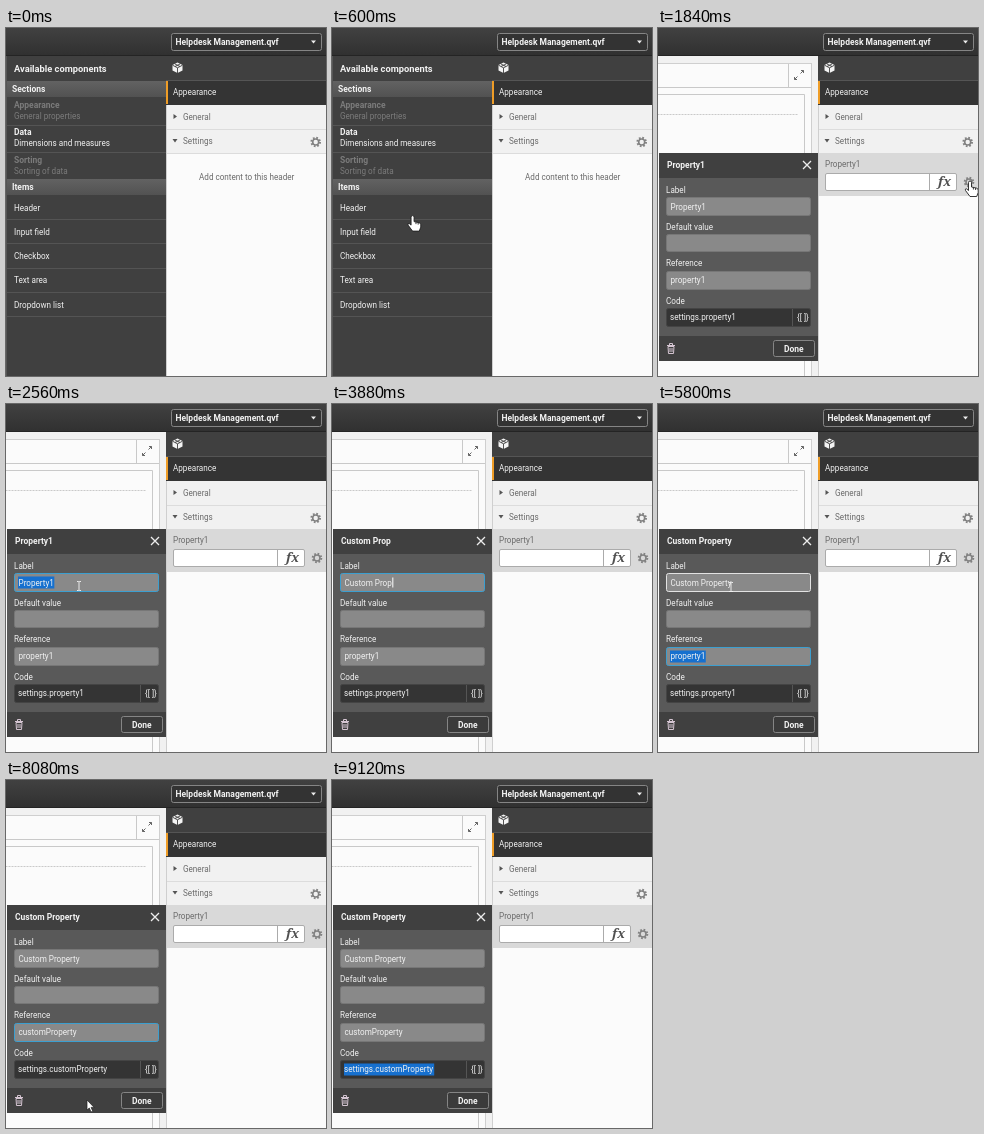
An HTML page for the animation above (9.2 s loop, 320x348 px).

```html
<!DOCTYPE html>
<html lang="en">
<head>
<meta charset="utf-8">
<title>Property editor</title>
<style>
  html, body { margin: 0; width: 100%; height: 100%; overflow: hidden; background: #fbfbfb; }
  svg { display: block; width: 320px; height: 348px; }
  text { font: 8.15px Roboto, sans-serif; fill: #f2f2f2; white-space: pre; }
  .bold { font-weight: 700; font-size: 8.5px; }
  .title { font-weight: 700; font-size: 9.3px; }
  .faded text { fill: #7b7b7b; }
  .grey { fill: #6a6a6a; }
  .fx { font: italic 700 13px "Noto Serif", "Liberation Serif", serif; fill: #505050; }
  .input { fill: #898989; stroke: #777; stroke-width: 1; }
  .input.hover { stroke: #e2e2e2; }
  .input.focus { stroke: #3c9fd0; }
  .input.dark { fill: #343434; stroke: #444; }
  .selection { fill: #1670cf; }
  .line { fill: none; stroke: #c9c9c9; }
  .pointer { stroke-linejoin: round; }
</style>
</head>
<body>
<svg viewBox="0 0 320 348">
  <defs>
    <linearGradient id="bar" x2="0" y2="1">
      <stop stop-color="#414141"/><stop offset="1" stop-color="#303030"/>
    </linearGradient>
    <linearGradient id="section" x2="0" y2="1">
      <stop stop-color="#626262"/><stop offset="1" stop-color="#525252"/>
    </linearGradient>
    <g id="gear" fill="none" stroke="#818181">
      <circle r="4.3" stroke-width="2" stroke-dasharray="1.69"/>
      <circle r="3" stroke-width="1.6"/>
    </g>
  </defs>

  <rect width="320" height="348" fill="#fbfbfb"/>

  <g id="sheet">
    <rect y="28" width="160" height="320" fill="#f1f1f1"/>
    <rect x="-1" y="35.5" width="154.5" height="320" fill="#fbfbfb" stroke="#cfcfcf"/>
    <path class="line" d="M0 59.5H153M130.5 36V59M0 66.5H146.5V348"/>
    <path class="line" d="M0 86.5H140" stroke-dasharray="1 .5"/>
    <path d="M142.5 45.5L145.5 42.5M143 42.5h2.5V45M139.5 48.5L136.500 51.500M139 51.500h-2.500V49" fill="none" stroke="#666"/>
  </g>

  <g id="components">
    <rect y="28" width="160" height="320" fill="#404040"/>
    <text class="title" x="8" y="43.500">Available components</text>
    <rect y="53" width="160" height="16" fill="url(#section)"/>
    <rect y="151" width="160" height="16" fill="url(#section)"/>
    <text class="bold" x="6" y="63.500">Sections</text>
    <text class="bold" x="6" y="161.500">Items</text>
    <g class="faded">
      <text class="bold" x="8" y="80">Appearance</text>
      <text x="8" y="91">General properties</text>
      <text class="bold" x="8" y="134.500">Sorting</text>
      <text x="8" y="145.500">Sorting of data</text>
    </g>
    <text class="bold" x="8" y="107">Data</text>
    <text x="8" y="118">Dimensions and measures</text>
    <text x="8" y="182.500">Header</text>
    <text x="8" y="206.500">Input field</text>
    <text x="8" y="231">Checkbox</text>
    <text x="8" y="255">Text area</text>
    <text x="8" y="279.500">Dropdown list</text>
    <path d="M0 97.500H160M0 124.500H160M0 191.500H160M0 215.500H160M0 240.500H160M0 264.500H160M0 288.500H160" stroke="#545454"/>
    <path d="M.5 28V348" stroke="#565656"/>
  </g>

  <rect width="320" height="28" fill="url(#bar)"/>
  <path d="M0 27.500H320" stroke="#242424"/>
  <rect x="165.500" y="5.500" width="150" height="17" rx="2" fill="#333" stroke="#858585"/>
  <text class="bold" x="169.500" y="17">Helpdesk Management.qvf</text>
  <path d="M305 12.500h5l-2.500 3z" fill="#eee"/>

  <rect x="160" y="28" width="160" height="24" fill="#404040"/>
  <path d="M171.500 34.500l5 2.500v5.500l-5 2.500l-5-2.500v-5.500z" fill="#f4f4f4"/>
  <path d="M166.500 37.200l5 2.600l5-2.600M171.500 39.800V45M169 36l5 2.500M174 36l-5 2.500" fill="none" stroke="#404040" stroke-width=".9"/>
  <rect x="160" y="52" width="160" height="25" fill="#343434"/>
  <path d="M160 52.500H320" stroke="#555"/>
  <rect x="160" y="53" width="2" height="23" fill="#ef9d27"/>
  <text x="167" y="67">Appearance</text>
  <rect x="161" y="77" width="159" height="48" fill="#f1f1f1"/>
  <path d="M161 101.500H320M161 125.500H320" stroke="#dcdcdc"/>
  <path d="M167.500 86v5l3.500-2.500zM166.500 111h5l-2.500 3.500z" fill="#555"/>
  <text class="grey" x="177" y="92">General</text>
  <text class="grey" x="177" y="116">Settings</text>
  <use href="#gear" x="309.700" y="114"/>

  <text id="empty" class="grey" x="193" y="152">Add content to this header</text>
  <g id="property">
    <rect id="active" x="161" y="125" width="159" height="43" fill="#d9d9d9"/>
    <text class="grey" x="167" y="139">Property1</text>
    <rect x="167.500" y="145.500" width="131" height="17" rx="1.500" fill="#fff" stroke="#ababab"/>
    <path d="M271.500 146V162" stroke="#ababab"/>
    <text class="fx" x="280" y="158">fx</text>
    <use href="#gear" x="311" y="154"/>
  </g>
  <path d="M160.500 77V348" stroke="#cfcfcf"/>

  <g id="dialog">
    <rect x="1" y="125" width="159" height="208" fill="#595959"/>
    <path d="M1 125h159v25H1zM1 308h159v25H1z" fill="#404040"/>
    <text id="heading" class="bold" x="9" y="140"/>
    <path d="M145 133l8 8M153 133l-8 8" stroke="#ededed" stroke-width="1.300"/>
    <text x="8" y="164.500">Label</text>
    <text x="8" y="201.500">Default value</text>
    <text x="8" y="238">Reference</text>
    <text x="8" y="275.500">Code</text>
    <rect id="labelBox" class="input" x="8.500" y="169.500" width="144" height="18" rx="2"/>
    <rect id="valueBox" class="input" x="8.500" y="206.500" width="144" height="17" rx="2"/>
    <rect id="referenceBox" class="input" x="8.500" y="243.500" width="144" height="18" rx="2"/>
    <rect class="input dark" x="8.500" y="280.500" width="144" height="18" rx="2"/>
    <path d="M134.500 281v17" stroke="#555"/>
    <text x="139" y="292">{[ ]}</text>
    <rect id="labelSelection" class="selection" x="12" y="172.500" height="12"/>
    <rect id="referenceSelection" class="selection" x="12" y="246.500" height="12"/>
    <rect id="codeSelection" class="selection" x="12" y="283.500" height="12"/>
    <text id="label" x="12.500" y="181.500"/>
    <text id="reference" x="12.500" y="255"/>
    <text id="code" x="12" y="292"/>
    <rect id="caret" width="1" height="10" fill="#fff"/>
    <path d="M9 317.500h8M11.500 317v-1.500h3v1.500M10 318.500l.5 7h5l.5-7zM12 320v4M14 320v4" fill="none" stroke="#d5c5d2"/>
    <rect x="115.500" y="312.500" width="41" height="16" rx="2" fill="#3b3b3b" stroke="#858585"/>
    <text class="bold" x="126" y="323.500">Done</text>
  </g>

  <g id="pointer" class="pointer">
    <path id="arrow" d="M0 0V10l2.300-2l1.700 4l1.800-.8l-1.700-3.800h3z" fill="#fff" stroke="#222" stroke-width=".7"/>
    <path id="hand" d="M-1.500 1.500q0-1.500 1.500-1.500t1.500 1.500V6l5 1.100q1.700.4 1.700 2v2.400L6.700 15.500H0L-4.500 9.500q-.8-1.900 1-1.700l2 1.700zM3.400 6.500v2M5.600 7v2" fill="#fff" stroke="#222" stroke-width=".9"/>
    <path id="beam" d="M-2-4.500h1.500l.5.500l.5-.5H2M0-4V4M-2 4.500h1.500l.5-.5l.5.500H2" fill="none" stroke="#f5f5f5" stroke-width=".9"/>
  </g>
</svg>
<script>
const LOOP = 9200;
const ui = Object.fromEntries([...document.querySelectorAll('[id]')].map(el => [el.id, el]));
const show = (el, on) => { el.style.display = on ? '' : 'none'; };
const within = (t, from, to) => t >= from && t < to;
const ease = p => p * p * (3 - 2 * p);

const rhythm = (start, step, count) => Array.from({ length: count }, (_, i) => start + step * i);
const labelKeys = [...rhythm(3000, 86, 11), 3960, 4200, 4440, 4560];
const referenceKeys = rhythm(6400, 90, 14);

function typed(t, before, after, keys) {
  const count = keys.filter(key => key <= t).length;
  return count ? after.slice(0, count) : before;
}

// Pointer stops: time, x, y, shape from that time on.
const stops = [
  [40, 110, 248, 'arrow'], [360, 42, 202, 'hand'], [440, 42, 202, 'hand'],
  [960, 211, 139, 'hand'], [1160, 214, 139, 'hand'], [1320, 214, 139, 'hand'],
  [1640, 312, 153, 'hand'], [1880, 312, 153, 'arrow'], [2200, 73, 182, 'beam'],
  [3000, 73, 182, ''], [5800, 73, 183, 'beam'], [5880, 73, 183, 'arrow'],
  [6240, 80, 316, 'arrow'], [6400, 80, 316, ''], [7760, 80, 316, 'arrow'],
  [8000, 81, 320, 'arrow'], [8120, 81, 320, 'arrow'], [8360, 78, 290, 'beam'],
  [8840, 78, 290, '']
];

function drawPointer(t) {
  const index = stops.findLastIndex(stop => stop[0] <= t);
  const [from, x, y, shape] = stops[index] || [0, 0, 0, ''];
  const [to, nextX, nextY] = stops[index + 1] || [LOOP, x, y];
  const p = ease((t - from) / (to - from));
  ui.pointer.setAttribute('transform', `translate(${x + (nextX - x) * p} ${y + (nextY - y) * p})`);
  for (const name of ['arrow', 'hand', 'beam']) show(ui[name], name === shape);
}

function select(name, on) {
  const box = ui[name + 'Selection'];
  show(box, on);
  if (on) box.setAttribute('width', ui[name].getComputedTextLength() + 1);
}

function drawDialog(t) {
  const label = typed(t, 'Property1', 'Custom Property', labelKeys);
  const reference = typed(t, 'property1', 'customProperty', referenceKeys);
  ui.heading.textContent = ui.label.textContent = label;
  ui.reference.textContent = reference;
  ui.code.textContent = 'settings.' + reference;

  ui.labelBox.classList.toggle('focus', within(t, 2320, 4760));
  ui.labelBox.classList.toggle('hover', within(t, 2160, 2320) || within(t, 5800, 5920));
  ui.valueBox.classList.toggle('focus', within(t, 4760, 4920));
  ui.referenceBox.classList.toggle('focus', within(t, 4920, 8760));
  select('label', within(t, 2440, 3000));
  select('reference', within(t, 4920, 6400));
  select('code', t >= 8840);

  const active = within(t, 3000, 4760) ? ui.label : within(t, 6400, 7640) ? ui.reference : null;
  show(ui.caret, active);
  if (active) {
    ui.caret.setAttribute('x', 13 + active.getComputedTextLength());
    ui.caret.setAttribute('y', active.getAttribute('y') - 8);
  }
}

function draw(t) {
  const editing = t >= 1760;
  show(ui.components, !editing);
  for (const name of ['sheet', 'dialog', 'active']) show(ui[name], editing);
  show(ui.empty, t < 1000);
  show(ui.property, t >= 1000);
  if (editing) drawDialog(t);
  drawPointer(t);
}

const start = performance.now();
function tick() {
  draw((performance.now() - start) % LOOP);
  requestAnimationFrame(tick);
}
tick();
</script>
</body>
</html>
```
